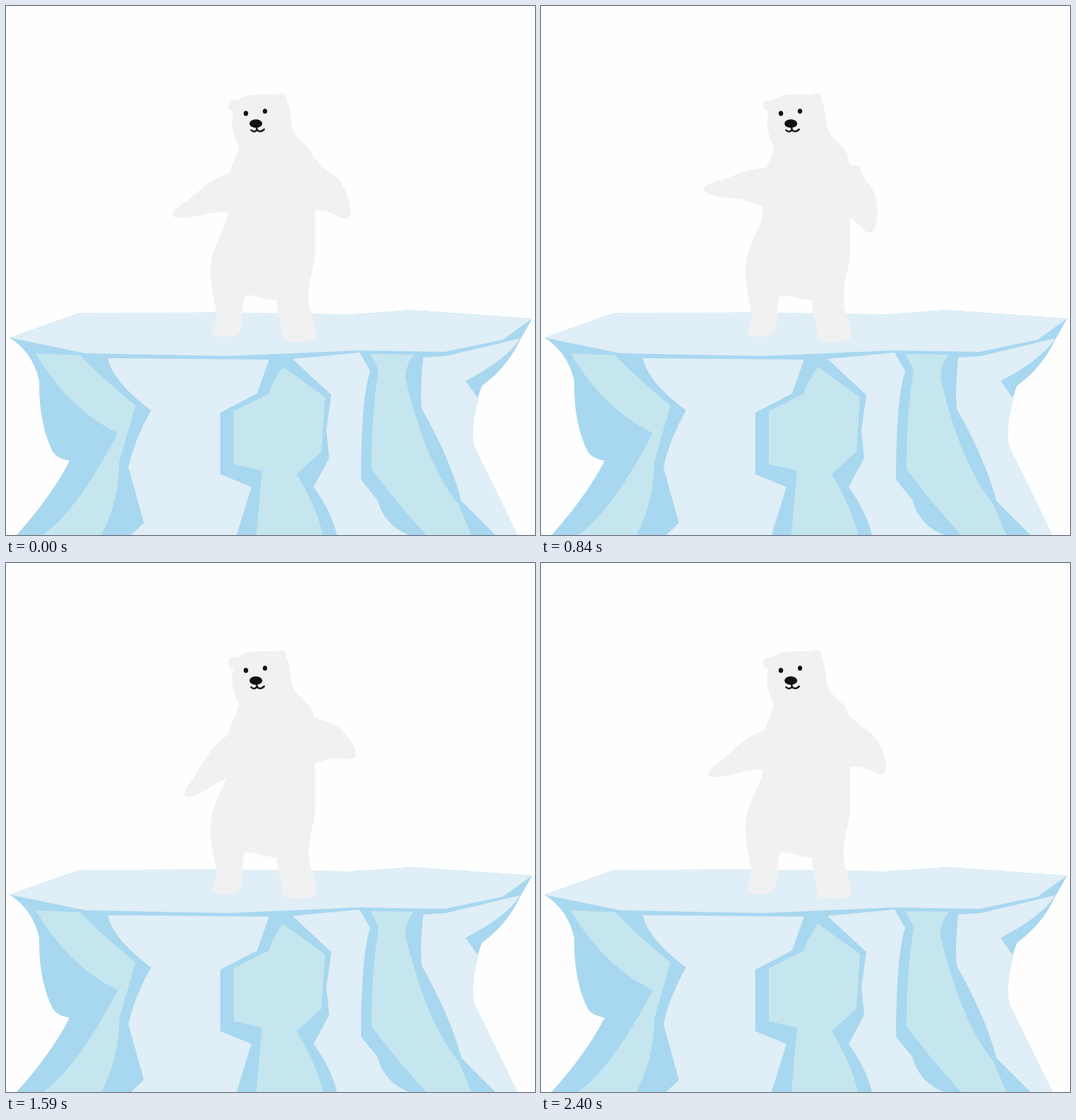
An HTML page that plays this animation: 748x748 px, repeating every 2430 ms.

```html
<!DOCTYPE html>
<html lang="en">
<head>
<meta charset="utf-8">
<title>Polar bear swinging its arms</title>
<style>
html, body { margin: 0; height: 100%; overflow: hidden; background: #fefefe; }
svg { display: block; width: 100vw; height: 100vh; }
.blue { fill: #a8d7f0; }
.pale { fill: #dfeef7; }
.teal { fill: #c5e6ee; }
.fur { fill: #f1f1f1; }
.ink { fill: #111; }
.mouth { fill: none; stroke: #111; stroke-width: 2.4; stroke-linecap: round; }
</style>
</head>
<body>
<svg viewBox="0 0 748 748">
  <g id="ice">
    <path class="blue" d="M5 469L104 434L490 436L573 430L744 442L727 472Q708 512 673 537Q650 600 663 625L723 748H15Q65 692 90 643Q72 640 66 630Q46 590 47 530Q38 490 5 469Z"/>
    <path class="pale" d="M5 469L104 434L300 433L490 436L573 430L744 442L702 472L620 489L500 487L312 495L112 491Z"/>
    <path class="teal" d="M42 491L105 494Q125 516 183 565L160 645Q160 700 135 748H52Q100 715 158 604Q88 570 42 491Z"/>
    <path class="pale" d="M144 498L372 500L355 548L303 575V662L347 680L326 748H177L195 731L173 652Q182 612 205 572Q150 530 144 498Z"/>
    <path class="teal" d="M391 510L451 553L446 630L411 662Q440 710 448 748H354L362 657L322 648V573L372 548L376 535Z"/>
    <path class="pale" d="M405 499L500 490L515 516Q502 555 502 670L525 698Q535 735 570 748H468Q460 715 435 680L457 639L453 600L460 550Z"/>
    <path class="teal" d="M515 492L577 493Q560 515 567 535Q595 650 640 705L658 748H594Q550 700 517 655Q516 580 527 515Z"/>
    <path class="pale" d="M590 497L622 495L727 470Q708 500 650 530L668 556Q656 600 663 625L723 748H692L644 700Q628 640 588 570Q585 545 590 497Z"/>
  </g>

  <g class="fur">
    <circle cx="322" cy="141" r="8"/>
    <circle cx="389" cy="131" r="8"/>
    <path d="M322 138C330 128 345 125 358 125S390 122 397 134C405 150 400 172 411 184L430 203C436 212 437 230 437 250V350C436 370 428 385 428 412C428 435 440 450 439 466C438 478 390 478 390 467C391 448 383 440 383 416C365 416 350 408 342 409C335 408 335 420 334 440C333 465 328 467 312 468C288 468 289 463 295 452C303 435 289 410 289 375C290 335 312 320 314 288C312 262 311 250 318 231C324 215 330 205 329 197C318 178 319 165 321 152Z"/>
    <path id="leftArm" d="M344 230L317 236C285 247 272 265 255 278C242 286 234 294 237 299C243 305 265 299 280 296C300 291 310 292 318 292L344 289Q372 260 344 230Z"/>
    <path id="rightArm" d="M414 222L440 217C446 226 452 233 460 239C474 248 481 264 485 285C486 298 484 305 477 305C465 302 455 290 437 291L414 290Q384 258 414 222Z"/>
  </g>

  <g class="ink">
    <ellipse cx="339.2" cy="151.8" rx="3.2" ry="3.6"/>
    <ellipse cx="366.2" cy="148.8" rx="3.1" ry="3.5"/>
    <ellipse cx="353.3" cy="166.2" rx="9" ry="6"/>
  </g>
  <path class="mouth" d="M354 171L355 175Q351 180 346.5 175.5M355 175Q359 180 365 174.5"/>
</svg>
<script>
const LOOP = 2430, PEAK = 607, SWING = 23;
const leftArm = document.getElementById('leftArm');
const rightArm = document.getElementById('rightArm');

function turn(arm, degrees, x, y) {
  arm.setAttribute('transform', `rotate(${degrees} ${x} ${y})`);
}

// Both arms sway together, like a pendulum.
function draw(time) {
  const sway = SWING * Math.cos(2 * Math.PI * (time - PEAK) / LOOP);
  turn(leftArm, sway + 1, 344, 260);
  turn(rightArm, sway - 3.5, 414, 257.5);
}

let start;
function tick(now) {
  start ??= now;
  draw((now - start) % LOOP);
  requestAnimationFrame(tick);
}
draw(0);
requestAnimationFrame(tick);
</script>
</body>
</html>
```
